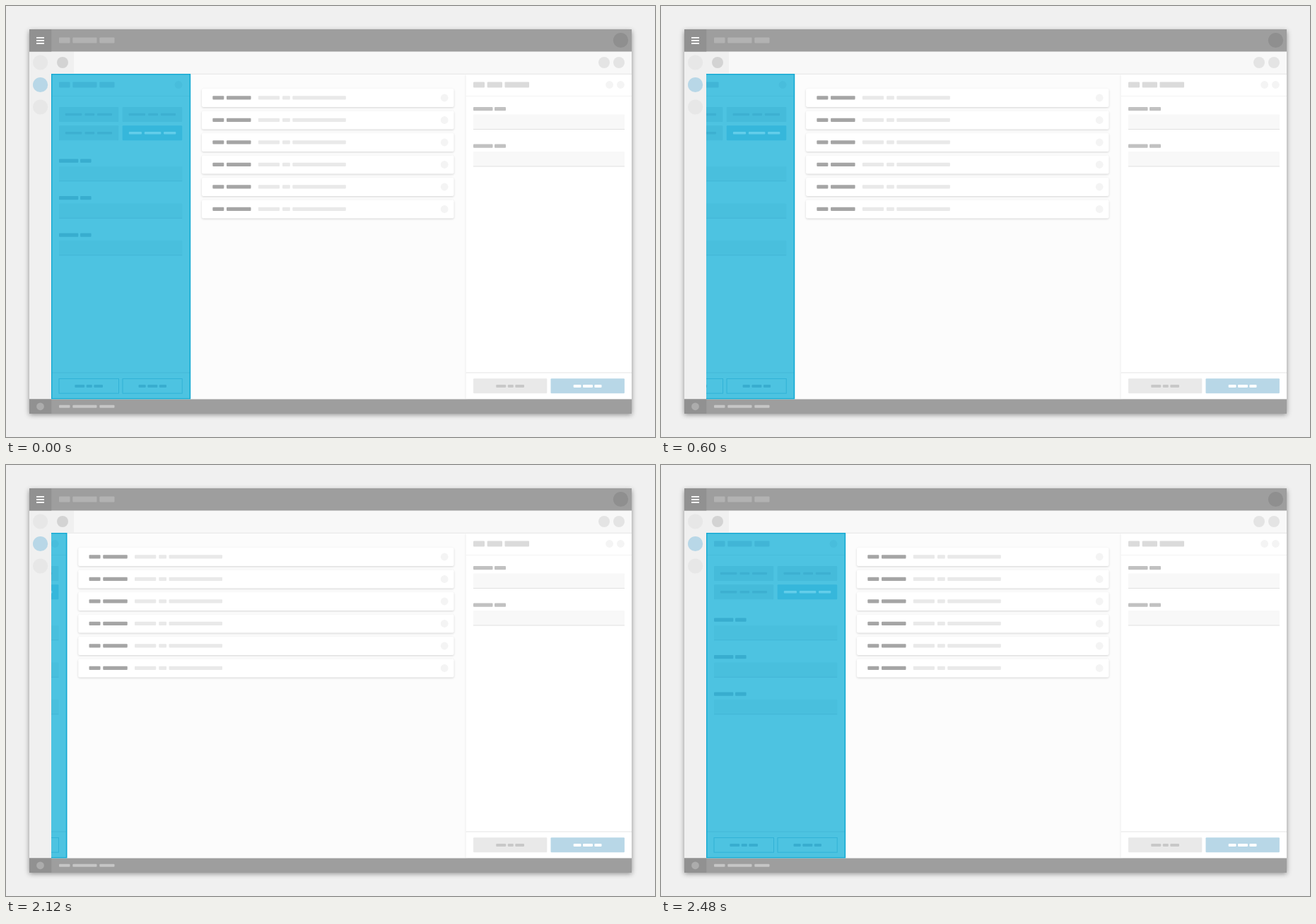
An HTML page with a canvas that plays this animation: 918 by 610 pixels, repeating every 3600 ms.

```html
<!DOCTYPE html>
<html lang="en">
<head>
<meta charset="utf-8">
<title>Collapsing side panel</title>
<style>
html, body { margin: 0; width: 100%; height: 100%; overflow: hidden; background: #f0f0f0; }
canvas { display: block; }
</style>
</head>
<body>
<canvas id="stage" width="918" height="610"></canvas>
<script>
const ctx = document.getElementById('stage').getContext('2d');
const LOOP = 3600, STEP = 40, TRAVEL = 198.7;

function box(x, y, w, h, color, r = 0) {
  ctx.fillStyle = color;
  ctx.beginPath();
  ctx.roundRect(x, y, w, h, r);
  ctx.fill();
}

function dot(x, y, r, color) {
  ctx.fillStyle = color;
  ctx.beginPath();
  ctx.arc(x, y, r, 0, 7);
  ctx.fill();
}

// spans: start and end x of each bar, in pairs
function bars(y, h, color, ...spans) {
  for (let i = 0; i < spans.length; i += 2)
    box(spans[i], y, spans[i + 1] - spans[i], h, color, 1);
}

function shadowed(color, blur, dy, draw) {
  ctx.save();
  ctx.shadowColor = color;
  ctx.shadowBlur = blur;
  ctx.shadowOffsetY = dy;
  draw();
  ctx.restore();
}

function clipped(x, y, w, h, draw) {
  ctx.save();
  ctx.beginPath();
  ctx.rect(x, y, w, h);
  ctx.clip();
  draw();
  ctx.restore();
}

// cubic-bezier(.42, 0, 1, 1)
function easeIn(x) {
  if (x <= 0) return 0;
  if (x >= 1) return 1;
  let lo = 0, hi = 1, s;
  for (let i = 0; i < 24; i++) {
    s = (lo + hi) / 2;
    const at = 1.26 * s * (1 - s) ** 2 + 3 * s * s * (1 - s) + s ** 3;
    if (at < x) lo = s; else hi = s;
  }
  return s * s * (3 - 2 * s);
}

// 0 = open, 1 = collapsed
function collapsed(t) {
  if (t < 440 || t >= 2480) return 0;
  if (t < 800) return easeIn((t - 397.8) / 372.8);
  if (t < 2120) return 1;
  return easeIn(1 - (t - 2089.5) / 411.5);
}

function list(shift) {
  const left = 277 - shift;
  for (let i = 0; i < 6; i++) {
    const y = 117 + i * 31.5;
    shadowed('rgba(0,0,0,.16)', 3, 1, () => box(left, y, 633.5 - left, 26, '#fff', 2));
    bars(y + 10.2, 5.3, '#a5a5a5', left + 15.3, left + 31.3, left + 35, left + 69.5);
    bars(y + 10.2, 5.3, '#e9e9e9', left + 79.8, left + 110, left + 114, left + 124.8,
      left + 128.3, left + 203.8);
    dot(620.2, y + 13, 5.4, '#f4f4f4');
  }
}

function sidePanel() {
  box(64, 96, 197, 460.5, '#4dc3e1');
  box(65, 127, 195, 1, '#48bddc');
  bars(107.6, 8, '#41b5d6', 75, 90.5, 94.3, 128.5, 132.3, 153.5);
  dot(244, 111.5, 5.4, '#48bddc');

  for (const y of [143, 169.3]) {
    const active = y > 150;
    box(75, y, 84.3, 21, '#45bbda', 1);
    box(164.7, y, 84.5, 21, active ? '#36b7db' : '#45bbda', 1);
    bars(y + 8.7, 3.6, '#3db0d1', 83.8, 107.3, 111.5, 125.2, 129, 150);
    if (active) bars(y + 8.7, 3.6, '#62cdea', 173.8, 192, 195.8, 219.3, 223, 240.3);
    else bars(y + 8.7, 3.6, '#3db0d1', 173.5, 197, 201.2, 215, 218.8, 240);
  }

  for (let i = 0; i < 3; i++) {
    const y = 216.4 + i * 52.5;
    bars(y, 5.3, '#38adcf', 75, 102.3, 105, 120.6);
    box(75, y + 10.5, 174.3, 21, '#49bfdd', 1);
    box(75, y + 30.8, 174.3, 1, '#42b6d6');
  }

  box(65, 518, 195, 2, '#48bddc');
  ctx.strokeStyle = '#31b2d6';
  ctx.lineWidth = 1;
  ctx.strokeRect(75, 527.5, 84.5, 20.7);
  ctx.strokeRect(165, 527.5, 84.2, 20.7);
  bars(536, 4, '#38adcf', 97.3, 111.2, 113.7, 121.8, 124.3, 137,
    187.5, 197.7, 200.3, 214.3, 216.8, 227);
  ctx.strokeStyle = '#12a8d2';
  ctx.lineWidth = 1.5;
  ctx.strokeRect(64.6, 96.6, 195.8, 459.3);
}

function detailPanel() {
  shadowed('rgba(0,0,0,.25)', 3, 0, () => box(650.5, 96.5, 234.5, 460, '#fff'));
  bars(107.6, 8, '#dbdbdb', 661, 677, 680.7, 702, 705.5, 740);
  dot(853.6, 111.5, 5.4, '#f4f4f4');
  dot(869.4, 111.5, 5.4, '#f4f4f4');
  box(650.5, 127, 234.5, 1, '#f3f3f3');
  for (const y of [143, 195.5]) {
    bars(y, 5.3, '#c1c1c1', 661, 688.5, 691, 707);
    box(661, y + 10.5, 214, 21, '#f8f8f8', 1);
    box(661, y + 31, 214, 1, '#e1e1e1');
  }
  box(650.5, 518, 234.5, 2, '#f2f2f2');
  box(661, 527.3, 104.3, 21, '#e9e9e9', 1);
  box(770.5, 527.3, 104.4, 21, '#b8d7e7', 1);
  bars(536, 4, '#c8c8c8', 693.2, 707.2, 709.8, 717.8, 720.3, 733);
  bars(536, 4, '#fff', 802.7, 813.5, 816, 830, 832.4, 842.5);
}

function frameBars() {
  box(64, 64.5, 821, 31.7, '#f8f8f8');
  box(64, 95.8, 821, 1, '#e6e6e6');
  box(33, 64.5, 31.3, 492, '#f0f0f0');
  box(64, 64.5, 32, 31.3, '#f0f0f0');
  dot(80, 80, 8, '#d3d3d3');
  dot(846, 80, 8, '#e4e4e4');
  dot(867, 80, 8, '#e4e4e4');
  ['#e7e7e7', '#b8d7e7', '#e7e7e7'].forEach((c, i) => dot(48.6, 80 + i * 31.5, 10.6, c));

  box(33, 33, 852, 31.5, '#9e9e9e');
  box(33, 33, 31.3, 31.5, '#919191');
  for (const y of [44, 48, 52]) box(43, y, 11, 1.8, '#fff');
  bars(44.6, 8, '#b2b2b2', 75, 90.5, 94.3, 128.5, 132.3, 153.5);
  dot(869.5, 48.5, 10.6, '#8f8f8f');

  box(33, 556.4, 852, 20.6, '#9e9e9e');
  box(33, 556.4, 31.3, 20.6, '#919191');
  dot(48.5, 566.8, 5.4, '#acacac');
  bars(564.8, 4, '#c6c6c6', 75, 90.5, 94.3, 128.5, 132.3, 153.5);
}

function draw(t) {
  const shift = TRAVEL * collapsed(t);
  box(0, 0, 918, 610, '#f0f0f0');
  shadowed('rgba(0,0,0,.42)', 7, 1.5, () => box(33, 33, 852, 544, '#fcfcfc'));
  list(shift);
  clipped(600, 96, 285, 461, detailPanel);
  frameBars();
  if (shift < 197) clipped(64, 95.8, 420, 460.8, () => {
    ctx.translate(-shift, 0);
    sidePanel();
  });
}

function tick() {
  const t = performance.now() % LOOP;
  draw(Math.floor(t / STEP) * STEP);
  requestAnimationFrame(tick);
}
tick();
</script>
</body>
</html>
```
